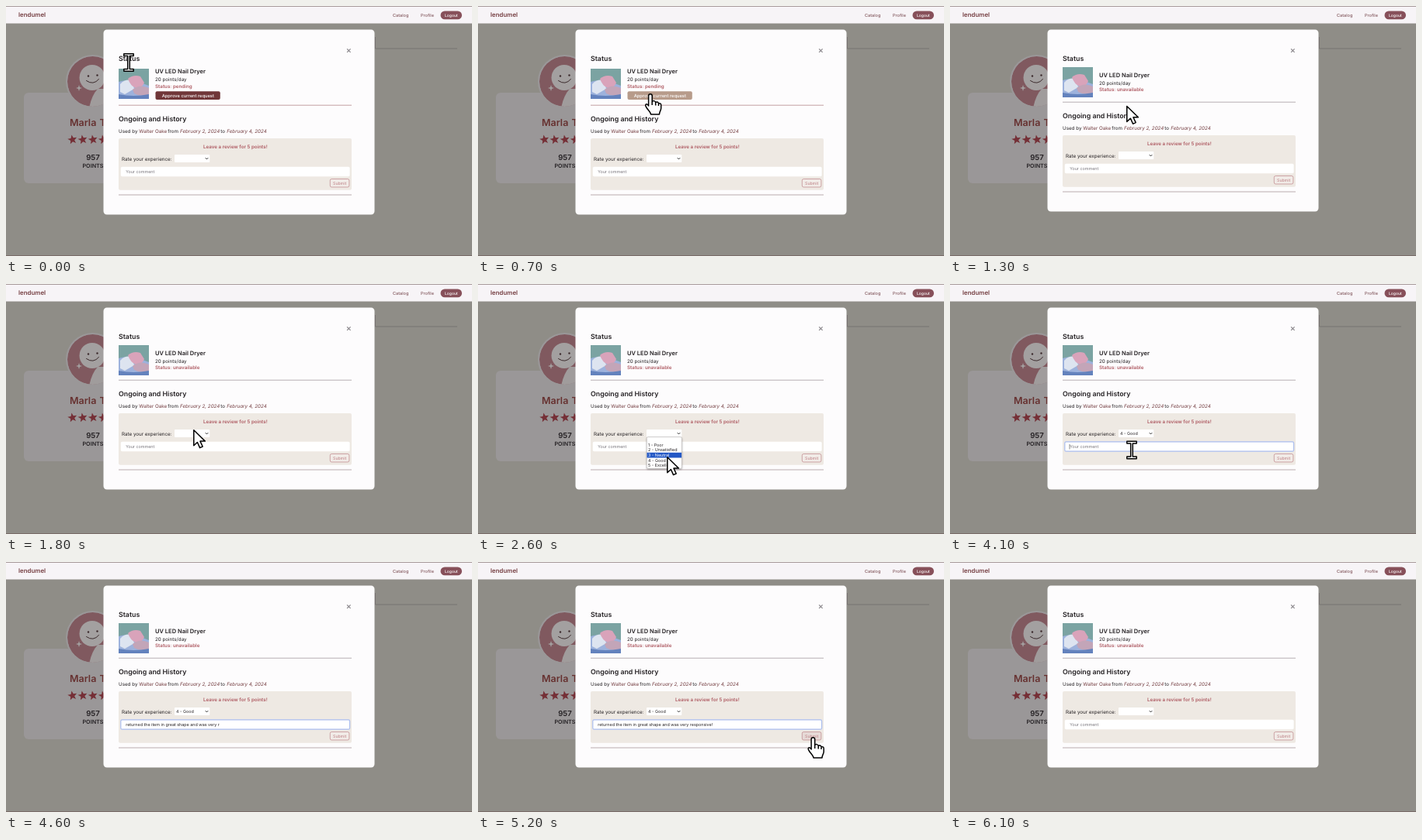
An HTML page that plays this animation: 600 by 323 pixels, repeating every 6.2 s.

```html
<!DOCTYPE html>
<html lang="en">
<head>
<meta charset="utf-8">
<title>Item review</title>
<style>
  html, body { margin: 0; width: 100%; height: 100%; overflow: hidden; background: #8f8d87; }
  svg { display: block; width: 100vw; height: 100vh; font: 6.25px Inter, sans-serif; fill: #242023; text-rendering: geometricPrecision; }
  .bold { font-weight: 600; }
  .heading { font-size: 8.8px; font-weight: 600; }
  .small { font-size: 5.4px; }
  .nav { font-size: 5.6px; fill: #74444a; }
  .rose { fill: #ae5a62; }
  .wine { fill: #743d40; }
  .mid { text-anchor: middle; }
  .cursor { fill: #fff; stroke: #000; stroke-width: 1.5; stroke-linejoin: round; }
</style>
</head>
<body>
<svg viewBox="0 0 600 323">
  <defs>
    <path id="star" transform="rotate(-10)" d="M0-6 1.6-1.9 6-1.7 2.5 1.1 3.7 5.3 0 2.9-3.7 5.3-2.5 1.1-6-1.7-1.6-1.9Z"/>
    <clipPath id="photoClip"><rect width="39" height="39"/></clipPath>
    <clipPath id="avatarClip"><circle cx="111.5" cy="97.5" r="32.5"/></clipPath>
    <filter id="shadow" x="-20%" y="-20%" width="140%" height="150%">
      <feDropShadow dx="0" dy="1" stdDeviation="1.2" flood-opacity=".4"/>
    </filter>
  </defs>

  <!-- dimmed page -->
  <rect width="600" height="323" fill="#8f8d87"/>
  <rect y="322.3" width="600" height=".7" fill="#6f5c59"/>
  <path d="M475.5 40V55H581" fill="none" stroke="#6c6867" stroke-width=".7"/>
  <rect x="23" y="112" width="178" height="117" rx="6" fill="#9a9798"/>
  <circle cx="111.5" cy="97.5" r="34.5" fill="#9a9798"/>
  <g clip-path="url(#avatarClip)">
    <circle cx="111.5" cy="97.5" r="32.5" fill="#80595f"/>
    <path d="M107 132Q110 116 118 107H128V132Z" fill="#a09c9c"/>
    <circle cx="111" cy="92.5" r="16.5" fill="#a3a0a0"/>
    <circle cx="106" cy="90.5" r="1.2" fill="#3c2b2d"/>
    <circle cx="117.5" cy="89.5" r="1.2" fill="#3c2b2d"/>
    <path d="M103.5 96.5Q112.5 103 119.5 94.5" fill="none" stroke="#3c2b2d" stroke-width="1" stroke-linecap="round"/>
    <path d="M94 102l1 3 3 1-3 1-1 3-1-3-3-1 3-1Z" fill="#a3a0a0"/>
  </g>
  <g fill="#66302f">
    <text x="82" y="155" font-size="12.5" font-weight="600">Marla</text>
    <text x="120.5" y="155" font-size="12.5" font-weight="600">T</text>
    <g fill="#752f36">
      <use href="#star" x="0" transform="translate(85.5 172.5)"/>
      <use href="#star" transform="translate(98.7 172.5)"/>
      <use href="#star" transform="translate(111.9 172.5)"/>
      <use href="#star" transform="translate(125 172.5)"/>
    </g>
  </g>
  <text class="mid bold" x="112" y="199" font-size="9.6">957</text>
  <text class="mid bold" x="112" y="208.5" font-size="7.2">POINTS</text>

  <!-- navigation -->
  <rect width="600" height="22.5" fill="#f7f4f7"/>
  <rect width="600" height=".6" fill="#75605f"/>
  <text class="wine bold" x="16" y="14.3" font-size="7.9">lendumel</text>
  <text class="nav" x="498" y="13.8">Catalog</text>
  <text class="nav" x="534" y="13.8">Profile</text>
  <rect x="559.5" y="6.5" width="27.5" height="10.8" rx="5.4" fill="#87505a"/>
  <text class="mid" x="573.3" y="13.7" font-size="5" font-weight="500" fill="#fff">Logout</text>

  <!-- dialog -->
  <rect id="dialog" x="125.5" y="30.5" width="349" height="239" rx="4.5" fill="#fdfcfd"/>
  <path d="M439.1 55.3l4.5 4.5m0-4.5l-4.5 4.5" stroke="#8a868b" stroke-width="1.2"/>
  <text class="heading" x="145" y="70.7">Status</text>
  <g id="photo">
    <g clip-path="url(#photoClip)">
      <rect width="39" height="39" fill="#7ba3a2"/>
      <path d="M0 17Q14 12 39 22V39H0Z" fill="#9db2dc"/>
      <path d="M2 20Q8 13 17 15L20 26 8 33 2 30Z" fill="#dde4f0"/>
      <path d="M12 13Q19 7 28 10L33 18Q30 26 22 25 15 22 12 13Z" fill="#d9a3ba"/>
      <path d="M18 27Q27 19 39 25V33Q29 37 20 32Z" fill="#c3a5b8"/>
      <path d="M0 33Q19 37 39 33V39H0Z" fill="#6382bd"/>
    </g>
  </g>
  <text id="product" class="bold" x="192" font-size="7.5">UV LED Nail Dryer</text>
  <text id="price" x="192">20 points/day</text>
  <text id="status" class="bold rose" x="192"></text>
  <g id="approve">
    <rect id="approveFill" x="192.5" y="110.3" width="83.3" height="10.8" rx="2"/>
    <text class="mid" x="234.3" y="117.8" font-size="5.75" font-weight="500" fill="#fff">Approve current request</text>
  </g>

  <g id="history">
    <path id="divider" d="M145 128.2H445" stroke-width=".8"/>
    <text class="heading" x="145" y="149.2">Ongoing and History</text>
    <text x="145" y="163.7">Used by</text>
    <text class="wine" x="171.3" y="163.7">Walter Oake</text>
    <text x="208.2" y="163.7">from</text>
    <text class="wine" x="224" y="163.7" font-style="italic">February 2, 2024</text>
    <text x="276.3" y="163.7">to</text>
    <text class="wine" x="284.3" y="163.7" font-style="italic">February 4, 2024</text>
    <rect x="145" y="171" width="300" height="66.8" rx="2" fill="#eee9e3"/>
    <text class="mid bold rose" x="295.3" y="183.7">Leave a review for 5 points!</text>
    <text x="149" y="200">Rate your experience:</text>
    <rect x="217" y="192" width="45.3" height="10" rx="1" fill="#fff"/>
    <path d="M256.8 196.2l1.7 1.7 1.7-1.7" fill="none" stroke="#222" stroke-width="1"/>
    <text id="rating" class="small" x="219" y="198.6"></text>
    <rect id="field" x="147.8" y="207.8" width="294.8" height="12.4" rx="1.8" fill="#fff" stroke-width="1.2"/>
    <text id="comment" class="small" x="154.2" y="216"></text>
    <path id="caret" d="M154 211V217.5" stroke="#111" stroke-width=".5"/>
    <rect id="submit" x="417.3" y="223.5" width="24.6" height="10.5" rx="2" stroke="#bd8588" stroke-width=".7"/>
    <text class="mid" x="429.6" y="230.7" font-size="5.2" fill="#bb7c81">Submit</text>
    <path d="M145 244H445" stroke="#a9969b" stroke-width=".8"/>
  </g>

  <g id="menu" class="small">
    <rect x="217.3" y="197.7" width="45" height="40.6" rx="1.5" fill="#fff" stroke="#a9a5a5" stroke-width=".5" filter="url(#shadow)"/>
    <rect id="highlight" x="217.5" width="44.6" height="6.7" fill="#2458c5"/>
  </g>

  <path id="beam" class="cursor" d="M-6.2-11.3H6.2V-8.6H1.3V8.6H6.2V11.3H-6.2V8.6H-1.3V-8.6H-6.2Z"/>
  <path id="arrow" class="cursor" d="M.8.8V20.8L5.4 16.5 8.6 23.6 12.2 22 9 15.1H15.4Z"/>
  <path id="hand" class="cursor" d="M-3.9 2C-3.9-1 .7-1 .7 2V9.5C1.8 8 5 8.3 5.2 10.7 6.2 9.4 8.8 9.8 9 12 10.2 11.2 12.2 12 12.2 14V18C12.2 21 10 22.5 10 26H-1C-1 23-7.2 18-7.8 14.5-7.8 12.4-5.6 12-3.9 15ZM.7 9.5V14M5.2 10.7V14.5M9 12V15"/>
</svg>
<script>
const LOOP = 6200, STEP = 100;
const REVIEW = "returned the item in great shape and was very responsive!";
const OPTIONS = ["", "1 - Poor", "2 - Unsatisfied", "3 - Neutral", "4 - Good", "5 - Excellent"];
const ROW = 6.7, MENU_TOP = 197.7;

// time, x, y of the pointer's hot spot
const PATH = [
  [0, 158, 73], [700, 223.5, 114], [1100, 223.5, 114],
  [1800, 241, 188], [2000, 241, 193], [2400, 246, 229], [2600, 243, 223],
  [2900, 246, 229], [3400, 249, 230], [3900, 234, 214.5], [4800, 234, 214.5],
  [5100, 430, 232], [5200, 433, 227], [6200, 433, 227]
];
const SHAPES = [
  [0, "beam"], [200, "arrow"], [500, "hand"], [1200, "arrow"], [3800, "beam"],
  [4200, ""], [4800, "beam"], [4900, "arrow"], [5200, "hand"], [6100, ""]
];
const TYPING = [[4100, 0], [4200, 6], [4600, 47], [4700, 47], [4900, REVIEW.length]];

const $ = id => document.getElementById(id);
const show = (id, on) => $(id).style.display = on ? "" : "none";
const within = (t, from, to) => t >= from && t < to;
const lerp = (a, b, k) => a + (b - a) * k;
const smooth = k => k * k * (3 - 2 * k);

function sample(keys, t, column, ease = k => k) {
  const next = keys.findIndex(key => key[0] > t);
  if (next === 0) return keys[0][column];
  if (next < 0) return keys[keys.length - 1][column];
  const a = keys[next - 1], b = keys[next];
  return lerp(a[column], b[column], ease((t - a[0]) / (b[0] - a[0])));
}

OPTIONS.forEach((label, i) => {
  const item = document.createElementNS("http://www.w3.org/2000/svg", "text");
  item.setAttribute("x", 219);
  item.setAttribute("y", MENU_TOP + i * ROW + 5.2);
  item.textContent = label;
  $("menu").append(item);
});

function drawDialog(t) {
  const approved = t >= 1100;
  $("dialog").setAttribute("height", approved ? 235 : 239);
  $("photo").setAttribute("transform", `translate(145 ${approved ? 79 : 81})`);
  $("product").setAttribute("y", approved ? 92 : 87.3);
  $("price").setAttribute("y", approved ? 101.7 : 97.2);
  $("status").setAttribute("y", approved ? 109.8 : 106.2);
  $("status").textContent = "Status: " + (approved ? "unavailable" : "pending");
  $("divider").setAttribute("stroke", approved ? "#a59c9f" : "#b38a8c");
  $("history").setAttribute("transform", `translate(0 ${approved ? -4 : 0})`);
  show("approve", !approved);
  $("approveFill").setAttribute("fill", t >= 500 ? "#b79b8a" : "#703638");
}

function drawForm(t) {
  const focused = within(t, 4000, 5500);
  const typed = t < 5500 ? Math.round(sample(TYPING, t, 1)) : 0;
  $("rating").textContent = within(t, 3500, 5500) ? OPTIONS[4] : "";
  $("comment").textContent = typed ? REVIEW.slice(0, typed) : "Your comment";
  $("comment").style.fill = typed ? "#242023" : "#77747a";
  $("field").setAttribute("stroke", focused ? "#a9bcee" : "none");
  $("submit").setAttribute("fill", within(t, 5200, 6100) ? "#e6d9d6" : "#f1ebe7");
  show("caret", focused && !typed);
}

function drawMenu(t, y) {
  const open = within(t, 2100, 3500);
  const row = Math.floor((y - MENU_TOP) / ROW);
  show("menu", open);
  show("highlight", open && row >= 0);
  $("highlight").setAttribute("y", MENU_TOP + row * ROW);
  $("menu").querySelectorAll("text").forEach((item, i) => item.style.fill = i === row ? "#fff" : "");
}

function draw(t) {
  const x = sample(PATH, t, 1, smooth), y = sample(PATH, t, 2, smooth);
  const shape = SHAPES.filter(key => key[0] <= t).pop()[1];
  drawDialog(t);
  drawForm(t);
  drawMenu(t, y);
  for (const id of ["beam", "arrow", "hand"]) {
    show(id, id === shape);
    $(id).setAttribute("transform", `translate(${x} ${y})`);
  }
}

const start = performance.now();
function frame() {
  const t = (performance.now() - start) % LOOP;
  draw(Math.floor(t / STEP) * STEP);
  requestAnimationFrame(frame);
}
frame();
</script>
</body>
</html>
```
